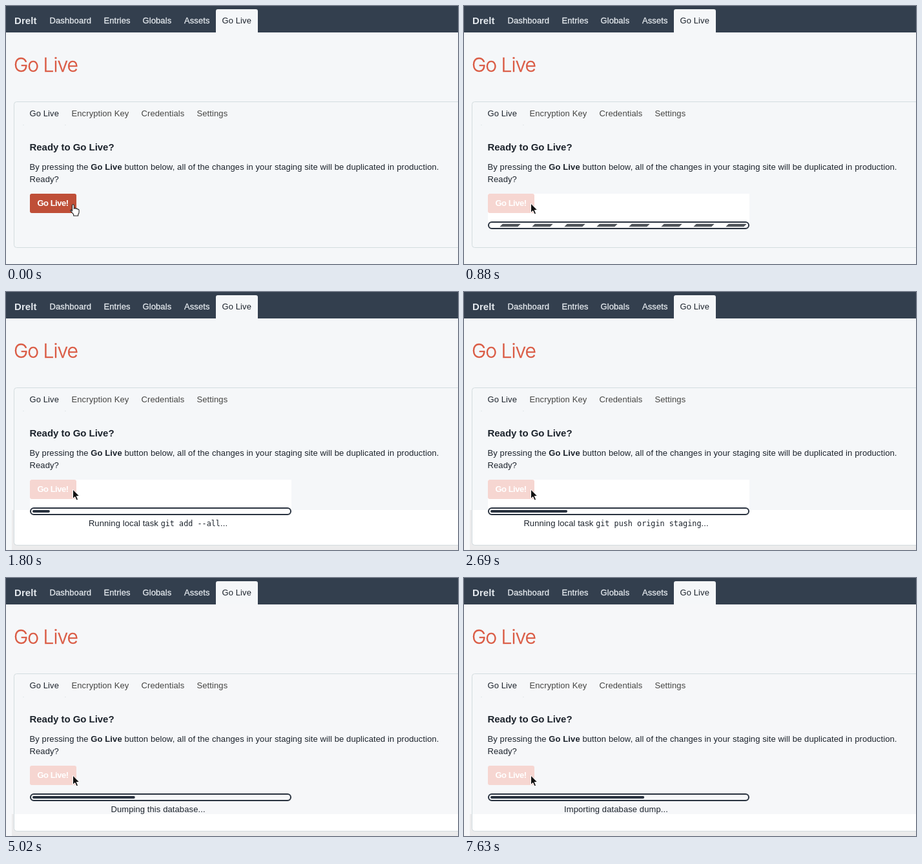
An HTML page for the animation above (8000 ms loop, 700 by 400 pixels).

```html
<!DOCTYPE html>
<html lang="en">
<head>
<meta charset="utf-8">
<title>Go Live</title>
<style>
  html, body { margin: 0; width: 100%; height: 100%; overflow: hidden; background: #f5f7f9; }
  svg { display: block; width: 700px; height: 400px; }
  text { font: 13px "Liberation Sans", Arial, sans-serif; letter-spacing: .1px; fill: #1c232c; white-space: pre; }
  .nav text { fill: #e4e9ee; stroke: #e4e9ee; stroke-width: .3px; }
  .nav .brand { font-size: 15px; font-weight: bold; stroke: none; }
  .nav .current { fill: #1c232c; stroke: none; }
  .title { font: 300 30px Inter, "Liberation Sans", sans-serif; letter-spacing: -1px; fill: #da5a43; stroke: #da5a43; stroke-width: .35px; }
  .tabs text { fill: #454543; }
  .tabs .current { fill: #1c232c; }
  .heading { font-size: 15px; font-weight: bold; letter-spacing: -.04px; }
  .bold { font-weight: bold; }
  .label { font-weight: bold; letter-spacing: -.5px; fill: #fff; }
  .status { text-anchor: middle; }
  .code { font: 11.8px "DejaVu Sans Mono", monospace; letter-spacing: 0; }
</style>
</head>
<body>
<svg viewBox="0 0 700 400">
  <defs>
    <clipPath id="track"><rect x="41" y="337.6" width="397" height="4.8" rx="2.4"/></clipPath>
  </defs>
  <rect id="page" width="700" height="400"/>

  <g class="nav">
    <rect width="700" height="41" fill="#333f4e"/>
    <path d="M325 41V8q0-3 3-3h59q3 0 3 3v33z" fill="#f5f7f9"/>
    <text class="brand" x="13" y="28">Drelt</text>
    <text x="67.500" y="27">Dashboard</text>
    <text x="151.500" y="27">Entries</text>
    <text x="211.500" y="27">Globals</text>
    <text x="276" y="27">Assets</text>
    <text class="current" x="334.500" y="27">Go Live</text>
  </g>
  <text class="title" x="12" y="102">Go Live</text>

  <g id="extension">
    <rect id="backdrop" x="9" width="691" fill="#ebebec"/>
    <path id="whiteArea" fill="#fff"/>
  </g>
  <rect id="panel" x="12.5" y="148.5" width="700" rx="4" fill="none" stroke="#d3dcdf"/>
  <path d="M26 184.500h2M91 184.500h2" stroke="#e3e8ea"/>

  <g class="tabs">
    <text class="current" x="36.500" y="171">Go Live</text>
    <text x="101.500" y="171">Encryption Key</text>
    <text x="209.500" y="171">Credentials</text>
    <text x="295.500" y="171">Settings</text>
  </g>
  <text class="heading" x="36.500" y="224">Ready to Go Live?</text>
  <text x="36.500" y="254">By pressing the <tspan class="bold">Go Live</tspan> button below, all of the changes in your staging site will be duplicated in production.</text>
  <text x="36.500" y="273">Ready?</text>

  <rect id="patch" x="37" y="291" width="405" height="55" fill="#fff"/>
  <rect id="button" x="37" y="291" width="72" height="30" rx="3"/>
  <text class="label" x="48.500" y="310">Go Live!</text>

  <g id="progress">
    <rect x="38" y="335" width="403" height="10" rx="5" fill="none" stroke="#29323f" stroke-width="2"/>
    <g clip-path="url(#track)"><path id="stripes" fill="#50555b"/></g>
    <rect id="bar" x="41" y="338" height="4" rx="2" fill="#29323f"/>
  </g>
  <text class="status" x="235.500" y="363"><tspan id="message"></tspan><tspan id="command" class="code"></tspan><tspan id="dots">...</tspan></text>

  <path id="hand" fill="#fff" stroke="#222" stroke-width="1.1" stroke-linejoin="round"
    d="M102.500 318v-8.500q0-1.700 1.400-1.700t1.400 1.700v5q.3-1.200 1.600-1.100t1.500 1.300q.4-.9 1.600-.6t1.300 1.400q1.700-.7 1.800 1v3q0 2-1.400 3.700v2h-7v-2l-4.500-5.300q-.8-1.600.7-1.900z"/>
  <path id="arrow" fill="#111" stroke="#fff" stroke-width="1" stroke-linejoin="round"
    d="M103.500 306v14.500l3.300-3 2.300 5.300 2.500-1.100-2.300-5.200h4.500z"/>
</svg>

<script>
const LOOP = 8000, PRESSED = 360, STARTED = 1800, SETTLED = 3700;
const TRACK = 397, PERIOD = 50, STRIPE_SPEED = 1 / 16;
const stages = [
  { at: STARTED, done: .2, message: "Running local task ", command: "git add --all" },
  { at: 2570, done: .3, message: "Running local task ", command: "git push origin staging" },
  { at: SETTLED, done: .4, message: "Dumping this database" },
  { at: 5560, done: .5, message: "Copying database dump" },
  { at: 7510, done: .6, message: "Importing database dump" },
];

const el = id => document.getElementById(id);
const show = (id, on) => el(id).setAttribute("display", on ? "inline" : "none");
const set = (id, attrs) => {
  for (const name in attrs) el(id).setAttribute(name, attrs[name]);
};

function stripePath(t) {
  const offset = (5 + (t - 880) * STRIPE_SPEED) % PERIOD;
  let d = "";
  for (let x = offset - PERIOD; x < 450; x += PERIOD) d += `M${x} 342.400h28l5-4.800h-28z`;
  return d;
}

function drawStage(t) {
  const index = stages.findLastIndex(stage => t >= stage.at);
  const stage = stages[index];
  const before = index > 0 ? stages[index - 1].done : 0;
  const grown = Math.min(1, (t - stage.at + 60) / 180);
  set("bar", { width: TRACK * (before + (stage.done - before) * grown) });
  el("message").textContent = stage.message;
  el("command").textContent = stage.command || "";
}

function render(t) {
  const pressed = t >= PRESSED, started = t >= STARTED, settled = t >= SETTLED;
  const top = settled ? 366 : 338;

  set("page", { fill: settled ? "#f6f7f9" : "#f5f7f9" });
  set("panel", { height: started ? 244 : 226 });
  set("backdrop", { y: top, height: 400 - top });
  set("whiteArea", { d: `M13 ${top}H700V392H17q-4 0-4-4z` });
  set("button", { fill: pressed ? "#f6d6d1" : "#bf4f38" });
  show("extension", started);
  show("patch", pressed && !settled);
  show("progress", pressed);
  show("hand", !pressed);
  show("arrow", pressed);
  show("stripes", !started);
  show("bar", started);
  for (const id of ["message", "command", "dots"]) show(id, started);

  if (started) drawStage(t);
  else set("stripes", { d: stripePath(t + LOOP) });
}

const start = performance.now();
function tick() {
  render((performance.now() - start) % LOOP);
  requestAnimationFrame(tick);
}
tick();
</script>
</body>
</html>
```
